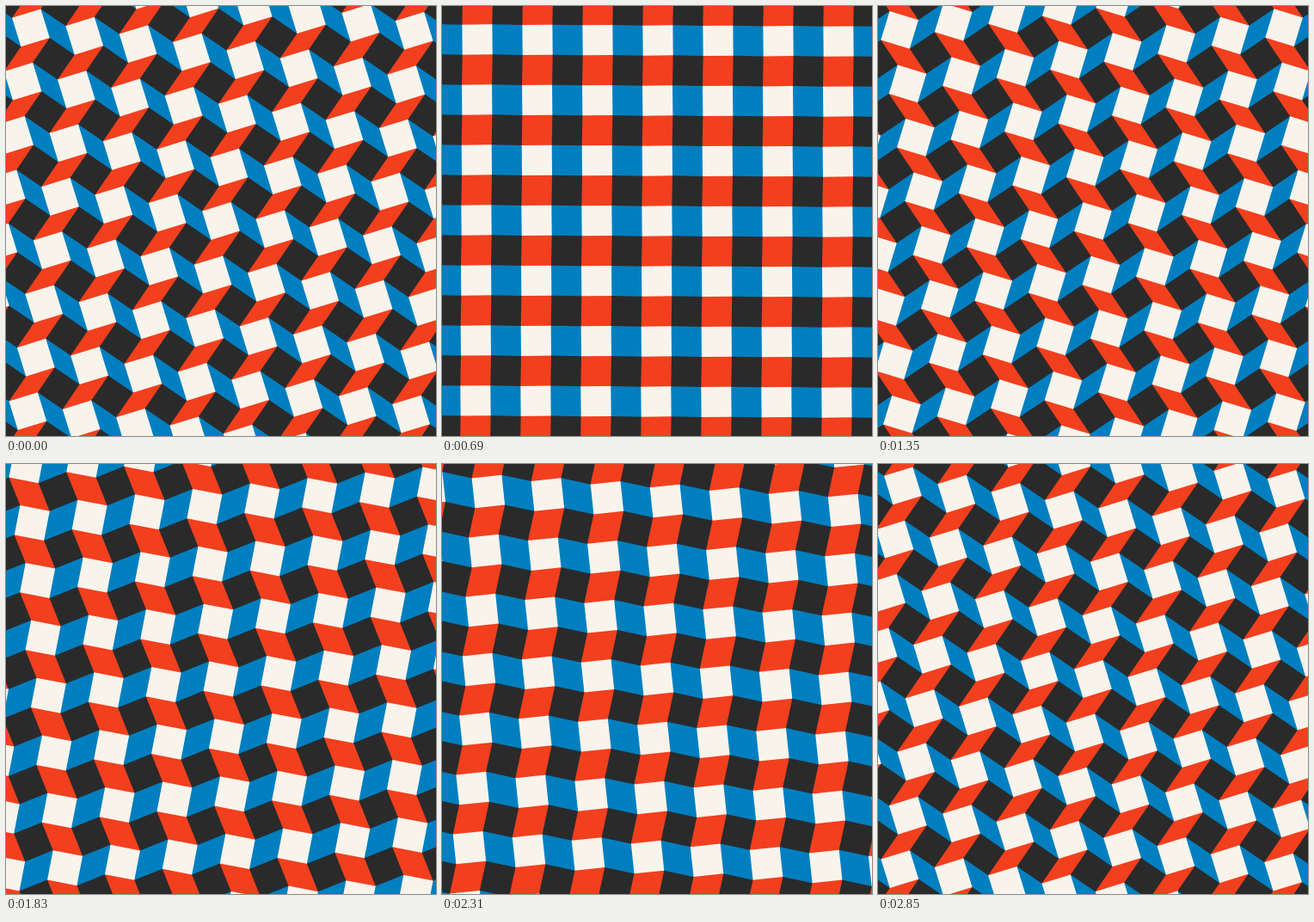
Animation of 500x500 px, one loop 2.88 s. Source, as an HTML page with a canvas:

```html
<!DOCTYPE html>
<html>
<head>
<meta charset="utf-8">
<style>
html, body { margin: 0; width: 100%; height: 100%; overflow: hidden; background: #2a2a2a; }
canvas { display: block; }
</style>
</head>
<body>
<canvas id="stage" width="500" height="500"></canvas>
<script>
const ctx = document.getElementById('stage').getContext('2d');
const LOOP = 2880, STEP = 30, SIDE = 35, SWING = 0.3, REACH = 7;
const BLACK = '#2a2a2a', WHITE = '#f8f4ec', RED = '#f23f1e', BLUE = '#007fc0';

const polar = angle => [SIDE * Math.cos(angle), SIDE * Math.sin(angle)];
const turn = ([x, y]) => [-y, x];
const add = (a, b) => [a[0] + b[0], a[1] + b[1]];
const mix = (a, s, b, t) => [a[0] * s + b[0] * t, a[1] * s + b[1] * t];

// Fills one polygon at every lattice point.
function tile(color, points, u, v) {
  ctx.fillStyle = color;
  ctx.beginPath();
  for (let i = -REACH; i <= REACH; i++) {
    for (let j = -REACH; j <= REACH; j++) {
      const origin = add([250, 250], mix(u, i, v, j));
      points.forEach((p, k) => ctx[k ? 'lineTo' : 'moveTo'](...add(origin, p)));
      ctx.closePath();
    }
  }
  ctx.fill();
}

function draw(time) {
  const step = Math.floor(time % LOOP / STEP);
  const swing = SWING * Math.cos(2 * Math.PI * (step + 0.5) * STEP / LOOP);
  const p = polar(-swing), q = polar(2 * swing);  // edges of white and black squares
  const pv = turn(p), qv = turn(q);
  const u = add(p, q), v = add(pv, qv);
  const corner = (s, t) => mix(p, s / 2, pv, t / 2);
  const nw = corner(-1, -1), ne = corner(1, -1), se = corner(1, 1), sw = corner(-1, 1);

  ctx.fillStyle = BLACK;
  ctx.fillRect(0, 0, 500, 500);
  // The rhombi reach under the white squares so that no seams show.
  tile(BLUE, [[0, 0], ne, add(ne, q), u, add(se, q), se], u, v);
  tile(RED, [[0, 0], se, add(se, qv), v, add(sw, qv), sw], u, v);
  tile(WHITE, [nw, ne, se, sw], u, v);
}

const start = performance.now();
function frame() {
  draw(performance.now() - start);
  requestAnimationFrame(frame);
}
frame();
</script>
</body>
</html>
```
